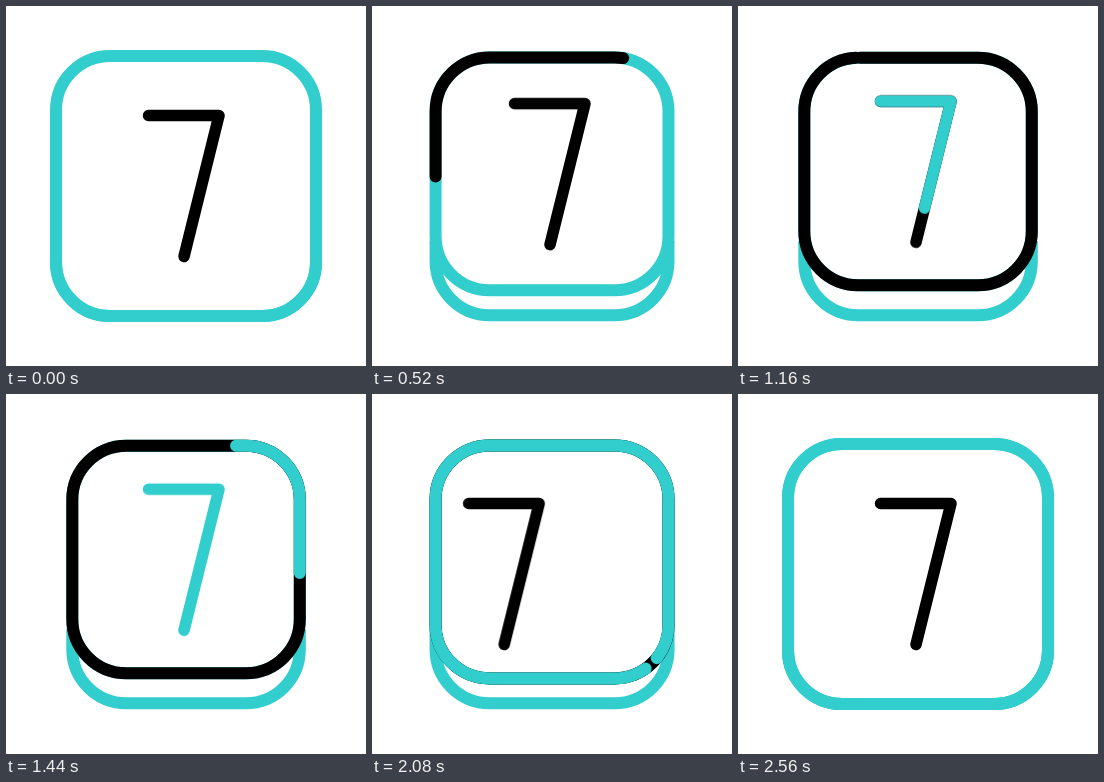
An HTML page for the animation above (2800 ms loop, 360 by 360 pixels).

```html
<!DOCTYPE html>
<html lang="en">
<head>
<meta charset="utf-8">
<title>Key 7</title>
<style>
  html, body { margin: 0; width: 100%; height: 100%; overflow: hidden; background: #fff; }
  svg { display: block; width: 100vw; height: 100vh; }

  svg * {
    --soft: cubic-bezier(.333, 0, .333, 1);
    --snap: cubic-bezier(.77, 0, .23, 1);
    animation-duration: 2.8s;
    animation-iteration-count: infinite;
  }
  .line { fill: none; stroke-width: 12px; stroke-linecap: round; stroke-linejoin: round; }
  .seven { stroke-width: 11.5px; }
  .teal { stroke: #32cdcd; }
  .black { stroke: #000; }

  /* key body: wide at rest, smaller while raised */
  .cap, .base { x: 50px; y: 50px; width: 260px; height: 260px; rx: 54px; animation-timing-function: var(--snap); }
  .cap { animation-name: cap; }
  .base { animation-name: base; }
  .lift { animation-name: lift; animation-timing-function: var(--snap); }
  @keyframes cap {
    0%, 2.32%, 90.54%, 100% { x: 50px; y: 50px; width: 260px; height: 260px; }
    28.57%, 64.29% { x: 66.3px; y: 51.7px; width: 227.5px; height: 227.5px; }
  }
  @keyframes base {
    0%, 2.32%, 90.54%, 100% { x: 50px; y: 50px; width: 260px; height: 260px; }
    28.57%, 64.29% { x: 66.3px; y: 51.7px; width: 227.5px; height: 257.5px; }
  }
  @keyframes lift {
    0%, 2.32%, 90.54%, 100% { transform: translateY(0); }
    28.57%, 64.29% { transform: translateY(-14.3px); }
  }

  /* colour running round the key */
  .run {
    animation-timing-function: var(--snap), var(--soft), linear, step-end;
  }
  .run.black { animation-name: cap, grow1, turn1, show1; }
  .run.teal { animation-name: cap, grow2, turn2, show2; }
  @keyframes grow1 {
    0%, 7.68% { stroke-dasharray: 0 100; }
    44.46%, 100% { stroke-dasharray: 100 0; }
  }
  @keyframes turn1 {
    0%, 7.68% { stroke-dashoffset: 26.5; }
    44.46%, 100% { stroke-dashoffset: -2.6; }
  }
  @keyframes show1 {
    0% { opacity: 0; }
    7.68% { opacity: 1; }
    79.75%, 100% { opacity: 0; }
  }
  @keyframes grow2 {
    0%, 42.96% { stroke-dasharray: 0 100; }
    79.75%, 100% { stroke-dasharray: 100 0; }
  }
  @keyframes turn2 {
    0%, 42.96% { stroke-dashoffset: -1.3; }
    79.75%, 100% { stroke-dashoffset: -53.8; }
  }
  @keyframes show2 {
    0% { opacity: 0; }
    42.96%, 100% { opacity: 1; }
  }

  /* digit: recoloured, slides out right, returns from the left */
  .old { animation-name: old; animation-timing-function: step-end; }
  .tint { animation-name: draw, leave, tint; animation-timing-function: var(--soft), var(--soft), step-end; }
  .new { animation-name: enter, fresh; animation-timing-function: var(--soft), step-end; }
  @keyframes old {
    0% { opacity: 1; }
    50.2%, 100% { opacity: 0; }
  }
  @keyframes draw {
    0%, 28.57% { stroke-dasharray: 0 100; }
    50%, 100% { stroke-dasharray: 100 100; }
  }
  @keyframes leave {
    0%, 57.6% { transform: translateX(0); }
    87.5%, 100% { transform: translateX(220px); }
  }
  @keyframes tint {
    0% { opacity: 0; }
    28.57% { opacity: 1; }
    87.5%, 100% { opacity: 0; }
  }
  @keyframes enter {
    0%, 57.6% { transform: translateX(-220px); }
    87.5%, 100% { transform: translateX(0); }
  }
  @keyframes fresh {
    0% { opacity: 0; }
    57.6%, 100% { opacity: 1; }
  }
</style>
</head>
<body>
<svg viewBox="0 0 360 360">
  <defs>
    <clipPath id="face"><rect class="cap"/></clipPath>
    <clipPath id="lower"><rect y="235" width="360" height="125"/></clipPath>
    <path id="seven" pathLength="100" d="M142.5 109.5H213L178 250.5"/>
  </defs>
  <g clip-path="url(#lower)"><rect class="line teal base"/></g>
  <g clip-path="url(#face)">
    <g class="lift">
      <use href="#seven" class="line seven black old"/>
      <use href="#seven" class="line seven teal tint"/>
    </g>
    <use href="#seven" class="line seven black new"/>
  </g>
  <rect class="line teal cap"/>
  <rect class="line black cap run" pathLength="100"/>
  <rect class="line teal cap run" pathLength="100"/>
</svg>
</body>
</html>
```
